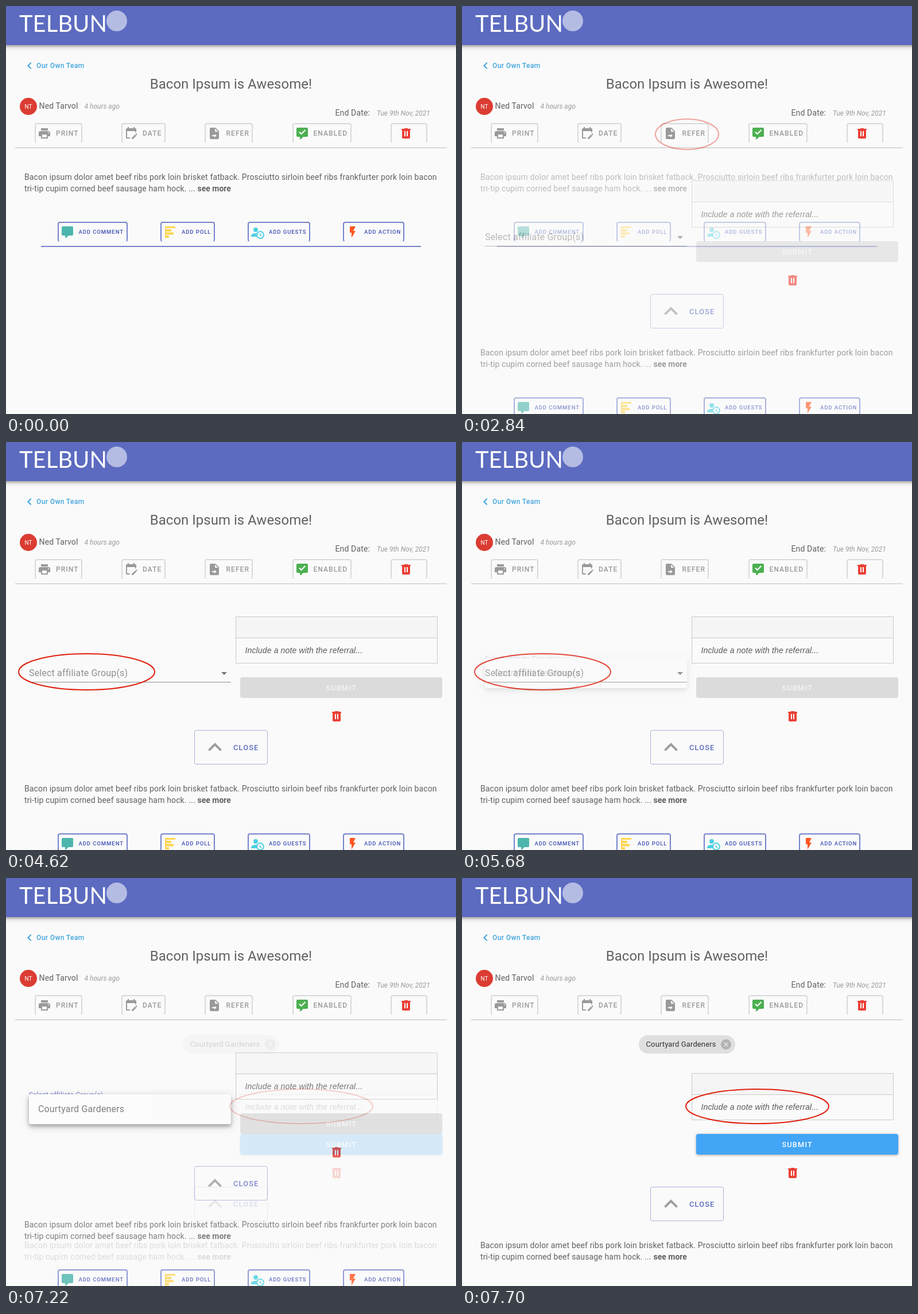
These frames come from a looping animation (784 px wide and 711 px high, 8000 ms). An HTML page:

```html
<!DOCTYPE html>
<html lang="en">
<head>
<meta charset="utf-8">
<title>Refer a topic</title>
<style>
  html, body { margin: 0; width: 100%; height: 100%; overflow: hidden; background: #fafafa; }
  svg { display: block; width: 784px; height: 711px; }
  text { font-family: Roboto, sans-serif; font-size: 14px; letter-spacing: .01em; fill: #616161; white-space: pre; }
  .title { font-size: 24px; letter-spacing: 0; text-anchor: middle; }
  .brand { font: 40px Lato, sans-serif; letter-spacing: 0; fill: #fff; }
  .back { font-size: 12px; font-weight: 500; letter-spacing: .4px; fill: #42a5df; }
  .date { font-size: 12px; font-style: italic; letter-spacing: 0; fill: #9a9a9a; }
  .bold { font-weight: 700; letter-spacing: 0; }
  .tool, .add, .btn { font-weight: 500; letter-spacing: .0892em; }
  .tool { font-size: 12px; fill: #9a9a9a; }
  .add { font-size: 9.6px; fill: #3f51b5; }
  .btn { font-size: 12.8px; fill: #fff; }
  .hint { font-family: "Liberation Sans", Arial, sans-serif; font-style: italic; fill: #595959; }
  .field { font-size: 16px; }
  .tabs { fill: none; stroke-width: 2; }
  .ring { fill: none; stroke: #e0200f; stroke-width: 2; }
  .page { fill: #fafafa; }
  .bar { fill: #5c6bc0; filter: drop-shadow(0 2px 2px #0004) drop-shadow(0 2px 5px #0003); }
  .menu { fill: #fcfcfc; filter: drop-shadow(0 4px 3px #0005) drop-shadow(0 3px 7px #0003); }
  .go { fill: #42a5f5; filter: drop-shadow(0 1px 2px #0005); }

  /* Every dissolve takes ten steps of 60 ms, the first at once. */
  .fade { opacity: 0; animation: 8s linear infinite; animation-timing-function: steps(9, jump-both); }
  .refer { animation-name: refer; }
  .form { animation-name: form; }
  .pick { animation-name: pick; }
  .list { animation-name: list; }
  .chosen { animation-name: chosen; }
  @keyframes refer { 0%, 12.49% { opacity: 0 } 19.24%, 31.74% { opacity: 1 } 38.49%, 100% { opacity: 0 } }
  @keyframes form { 0%, 31.74% { opacity: 0 } 38.49%, 100% { opacity: 1 } }
  @keyframes pick { 0%, 50.99% { opacity: 0 } 57.74%, 100% { opacity: 1 } }
  @keyframes list { 0%, 70.24% { opacity: 0 } 76.99%, 100% { opacity: 1 } }
  @keyframes chosen { 0%, 89.49% { opacity: 0 } 96.24%, 100% { opacity: 1 } }
</style>
</head>
<body>
<svg viewBox="0 0 784 711">
  <defs>
    <path id="trash" fill="#ea4034" d="M9 3V4H4V6H5V19A2 2 0 0 0 7 21H17A2 2 0 0 0 19 19V6H20V4H15V3ZM9 8H11V17H9ZM13 8H15V17H13Z" fill-rule="evenodd"/>
    <path id="bubble" d="M9 22A1 1 0 0 1 8 21V18H4A2 2 0 0 1 2 16V4A2 2 0 0 1 4 2H20A2 2 0 0 1 22 4V16A2 2 0 0 1 20 18H13.9L10.2 21.7Q9.9 22 9.5 22Z"/>

    <g id="topic">
      <text x="32" y="303">Bacon ipsum dolor amet beef ribs pork loin brisket fatback. Prosciutto sirloin beef ribs frankfurter pork loin bacon</text>
      <text x="32" y="323">tri-tip cupim corned beef sausage ham hock. ...</text>
      <text class="bold" x="333.5" y="323">see more</text>
      <g class="tabs" stroke="#7583cb">
        <path d="M92 410q-1-1.5-1-3.5v-26.500q0-3 3-3h114q3 0 3 3v26.500q0 2-1 3.500"/>
        <path d="M271 410q-1-1.5-1-3.5v-26.500q0-3 3-3h87q3 0 3 3v26.500q0 2-1 3.500"/>
        <path d="M423 410q-1-1.5-1-3.5v-26.500q0-3 3-3h101q3 0 3 3v26.500q0 2-1 3.500"/>
        <path d="M589 410q-1-1.5-1-3.5v-26.500q0-3 3-3h99q3 0 3 3v26.500q0 2-1 3.500"/>
        <path d="M61 419H723"/>
      </g>
      <use href="#bubble" x="95" y="382" fill="#4db6ac"/>
      <path fill="#ffd54f" d="M277 384h18v3h-16v2h9v4h-9v1.500h13v4h-13v1.500h5v4h-7z"/>
      <path transform="translate(426 382)" fill="#4dd0e1" fill-rule="evenodd" d="M10.6 14.100A7 7 0 1 1 10.670 20H1V18Q1.100 16.300 3.340 15.180T9 14Q9.900 14 10.600 14.100M9 4A3.950 3.950 0 0 1 9 11.950A3.950 3.950 0 0 1 9 4M17 22A5 5 0 0 0 17 12A5 5 0 0 0 17 22M16 14H17.500V16.820L19.940 18.230L19.190 19.530L16 17.690Z"/>
      <path transform="translate(592 382)" fill="#ff5722" d="M7 2V13H10V22L17 10H13L17 2Z"/>
      <text class="add" x="126.500" y="397">ADD COMMENT</text>
      <text class="add" x="306" y="397">ADD POLL</text>
      <text class="add" x="458" y="397">ADD GUESTS</text>
      <text class="add" x="624" y="397">ADD ACTION</text>
    </g>

    <g id="note">
      <path fill="#f5f5f5" d="M400 304h352v37H400z"/>
      <path fill="none" stroke="#c9c9c9" d="M400.500 304.500h351v81h-351zM400.500 341.500h351"/>
      <text class="hint" x="416.500" y="368">Include a note with the referral...</text>
      <use href="#trash" x="564" y="466"/>
      <rect x="328.500" y="502.500" width="127" height="59" rx="3.500" fill="none" stroke="#a8b0db"/>
      <path transform="translate(340 508) scale(2)" fill="#9e9e9e" d="M7.410 15.410L12 10.830L16.590 15.410L18 14L12 8L6 14Z"/>
      <text class="btn" x="396" y="537" style="fill:#5c6bc0">CLOSE</text>
      <use href="#topic" y="306"/>
    </g>
  </defs>

  <rect class="page" width="784" height="711"/>
  <rect class="bar" x="-20" y="-20" width="824" height="88"/>
  <text class="brand" x="23" y="45">TELBUN</text>
  <circle cx="193" cy="26" r="18" fill="#b4bce3"/>

  <path transform="translate(29 92)" fill="#3fa2de" d="M15.410 16.580L10.830 12L15.410 7.410L14 6L8 12L14 18Z"/>
  <text class="back" x="53" y="108">Our Own Team</text>
  <text class="title" x="392" y="144">Bacon Ipsum is Awesome!</text>
  <circle cx="39" cy="175" r="15" fill="#db3c32"/>
  <text x="39" y="179" text-anchor="middle" style="font-size:10px;fill:#fff">NT</text>
  <text x="57.500" y="179">Ned Tarvol</text>
  <text class="date" x="136.500" y="179">4 hours ago</text>
  <text x="573.500" y="191">End Date:</text>
  <text class="date" x="646" y="191">Tue 9th Nov, 2021</text>

  <g class="tabs" stroke="#dadada">
    <path d="M52 238q-1-1.5-1-3.5v-26.500q0-3 3-3h75q3 0 3 3v26.500q0 2-1 3.500"/>
    <path d="M203 238q-1-1.5-1-3.5v-26.500q0-3 3-3h69q3 0 3 3v26.500q0 2-1 3.500"/>
    <path d="M348 238q-1-1.5-1-3.5v-26.500q0-3 3-3h76q3 0 3 3v26.500q0 2-1 3.500"/>
    <path d="M501 238q-1-1.5-1-3.5v-26.500q0-3 3-3h95q3 0 3 3v26.500q0 2-1 3.500"/>
    <path d="M672 238q-1-1.5-1-3.5v-26.500q0-3 3-3h56q3 0 3 3v26.500q0 2-1 3.500"/>
    <path d="M16 247H768"/>
  </g>
  <g fill="#9a9a9a" fill-rule="evenodd">
    <path transform="translate(55 210)" d="M18 3H6V7H18ZM19 12A1 1 0 0 1 19 10A1 1 0 0 1 19 12M16 19H8V14H16ZM19 8H5A3 3 0 0 0 2 11V17H6V21H18V17H22V11A3 3 0 0 0 19 8Z"/>
    <path transform="translate(206 210)" d="M11 19L9 21H5A2 2 0 0 1 3 19V5A2 2 0 0 1 5 3H6V1H8V3H16V1H18V3H19A2 2 0 0 1 21 5V9L19 11V8H5V19ZM21.400 12.300L22.700 13.580Q23 14 22.700 14.350L21.700 15.350L19.650 13.300L20.650 12.300Q21 12 21.400 12.300M19.070 13.880L21.120 15.930L15.060 22H13V19.940Z"/>
    <path transform="translate(351 210)" d="M6 2A2 2 0 0 0 4 4V20A2 2 0 0 0 6 22H18A2 2 0 0 0 20 20V8L14 2ZM13 3.500L18.500 9H13ZM8 15H12V13L16 16L12 19V17H8Z"/>
  </g>
  <use href="#bubble" x="504" y="210" fill="#4caf50"/>
  <path d="M511 219.500l3.500 3.500l7-7" fill="none" stroke="#fff" stroke-width="2"/>
  <use href="#trash" x="685" y="210"/>
  <text class="tool" x="87" y="226">PRINT</text>
  <text class="tool" x="238" y="226">DATE</text>
  <text class="tool" x="383.500" y="226">REFER</text>
  <text class="tool" x="535.500" y="226">ENABLED</text>

  <use href="#topic"/>
  <ellipse class="ring fade refer" cx="392" cy="223.500" rx="55" ry="26.500"/>

  <g class="fade form">
    <rect class="page" y="253" width="784" height="458"/>
    <text class="field" x="40" y="408" style="fill:#8f8f8f">Select affiliate Group(s)</text>
    <path stroke="#8e8e8e" d="M40 418.500H392"/>
    <path fill="#757575" d="M375 401h10l-5 5z"/>
    <rect x="408" y="410" width="352" height="36" rx="4" fill="#dbdbdb"/>
    <text class="btn" x="557.500" y="433" style="fill:#f4f4f4">SUBMIT</text>
    <use href="#note"/>
  </g>

  <ellipse class="ring fade pick" cx="140.500" cy="400.500" rx="118.500" ry="31.500"/>

  <g class="fade list">
    <rect class="page" x="18" y="366" width="381" height="82"/>
    <text x="40" y="382" style="font-size:12px;fill:#5c6bc0">Select affiliate Group(s)</text>
    <rect class="menu" x="40" y="377" width="352" height="52" rx="4"/>
    <text class="field" x="56" y="408">Courtyard Gardeners</text>
  </g>

  <g class="fade chosen">
    <rect class="page" y="253" width="784" height="458"/>
    <rect x="308" y="274" width="168" height="32" rx="16" fill="#dfdfdf"/>
    <text x="320.500" y="294" style="font-size:13px;fill:#333">Courtyard Gardeners</text>
    <circle cx="460" cy="290" r="9" fill="#b3b3b3"/>
    <path stroke="#e4e4e4" stroke-width="1.600" d="M456.500 286.500l7 7m0-7l-7 7"/>
    <rect class="go" x="408" y="446" width="352" height="36" rx="4"/>
    <text class="btn" x="557.500" y="469">SUBMIT</text>
    <use href="#note" y="36"/>
    <ellipse class="ring" cx="514.500" cy="398" rx="124.500" ry="30"/>
  </g>
</svg>
</body>
</html>
```
